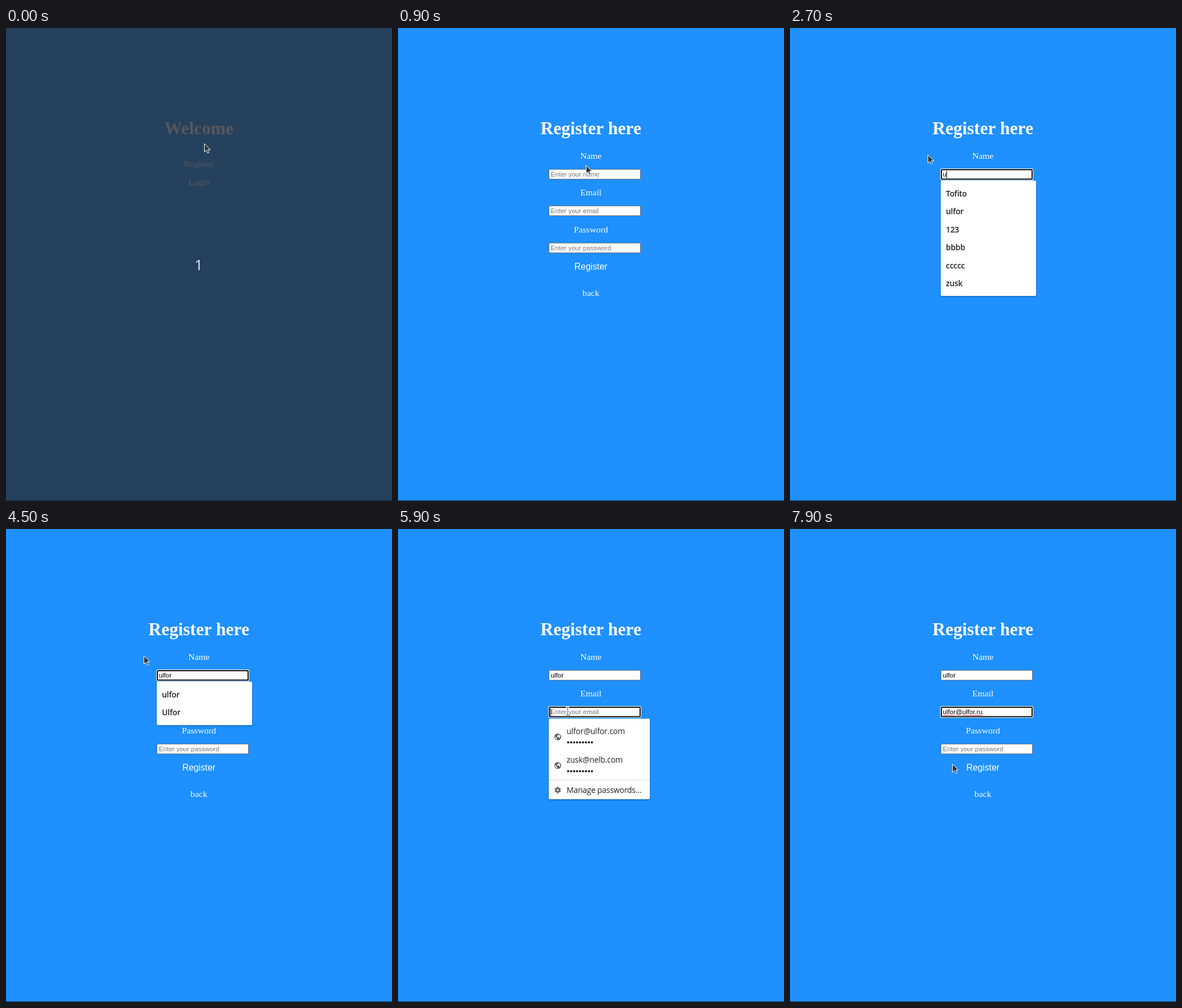
Write an HTML page that moves like this. It is 676x828 px and loops after 8000 ms.

```html
<!DOCTYPE html>
<html lang="en">
<head>
<meta charset="utf-8">
<title>Register form</title>
<style>
  html, body { margin: 0; width: 100%; height: 100%; overflow: hidden; background: #1e90ff; }
  svg { display: block; width: 676px; height: 828px; }
  text { white-space: pre; }
  .page { font: 15.6px "Liberation Serif", serif; fill: #fff; text-anchor: middle; }
  .title { font-size: 31.2px; font-weight: bold; }
  .button { font-family: "Liberation Sans", sans-serif; }
  .input { font: 11.56px "Liberation Sans", sans-serif; }
  .popup { font: 13.8px "Open Sans", sans-serif; letter-spacing: -.2px; fill: #202124; }
  .popup .panel { fill: #fff; filter: drop-shadow(0 1px 1.5px rgba(0, 0, 0, .35)); }
  .list { font-weight: 600; }
  .icon { fill: #5f6368; }
  .countdown { font: 26px "Open Sans", sans-serif; fill: #dbe9ff; text-anchor: middle; }
  .squiggle { fill: none; stroke: #f02828; stroke-width: .9; }
</style>
</head>
<body>
<svg viewBox="0 0 676 828">
  <rect id="back" width="676" height="828"/>
  <g id="welcome" class="page">
    <text class="title" x="337.8" y="186">Welcome</text>
    <text x="337.8" y="243">Register</text>
    <text x="337.8" y="275">Login</text>
  </g>
  <text id="count" class="countdown" x="337.5" y="424">1</text>

  <g id="form">
    <g class="page">
      <text class="title" x="337.8" y="186">Register here</text>
      <text x="337.8" y="229">Name</text>
      <text x="337.8" y="293">Email</text>
      <text x="337.8" y="357.5">Password</text>
      <text class="button" x="337.8" y="423">Register</text>
      <text x="337.8" y="469">back</text>
    </g>
    <g id="fields"></g>
    <path id="squiggle" class="squiggle"/>
    <rect id="caret" width="1" height="13"/>
    <g id="names" class="popup list"></g>
    <g id="logins" class="popup">
      <rect class="panel" x="264" y="332" width="177" height="141" rx="2"/>
      <text x="295.3" y="358.5">ulfor@ulfor.com</text>
      <text x="295.3" y="409">zusk@nelb.com</text>
      <path d="M264 439.5H441" stroke="#dadce0"/>
      <text x="295.3" y="462">Manage passwords…</text>
      <g id="extras"></g>
    </g>
  </g>

  <rect y="827" width="676" height="1" fill="#16283c"/>

  <g id="cursor">
    <path id="arrow" d="M.5 .5V15L3.8 11.9L6.2 17.2L8.6 16.1L6.3 11H10.8Z" fill="#2e3436" stroke="#fff"/>
    <g id="beam" fill="none">
      <path id="stem" d="M-3-7Q0-7 0-5V5Q0 7-3 7M3-7Q0-7 0-5M0 5Q0 7 3 7" stroke="#fff" stroke-width="2"/>
      <use href="#stem"/>
      <path d="M-3-7Q0-7 0-5V5Q0 7-3 7M3-7Q0-7 0-5M0 5Q0 7 3 7" stroke="#555"/>
    </g>
    <path id="hand" d="M-1.5 1Q0-1 1.5 1V7L7 8Q9 9 8.5 11L7 17H-1L-5 10Q-5 8-1.5 11Z" fill="#2e3436" stroke="#fff"/>
  </g>
</svg>

<script>
const LOOP = 8000, TICK = 100, TEXT_X = 267.6;
const $ = id => document.getElementById(id);

function add(parent, tag, attrs, text = "") {
  const node = document.createElementNS("http://www.w3.org/2000/svg", tag);
  for (const key in attrs) node.setAttribute(key, attrs[key]);
  node.textContent = text;
  return parent.appendChild(node);
}
const set = (node, attrs) => { for (const key in attrs) node.setAttribute(key, attrs[key]); };
const show = (node, on) => { node.style.display = on ? "" : "none"; };
const within = (t, from, to) => t >= from && t < to;

// Latest entry of a [time, ...values] track.
const latest = (track, t) => track.reduce((found, step) => step[0] <= t ? step : found);

const pointer = [
  [0, 347, 202, "arrow"], [100, 345.5, 207, "arrow"], [200, 342, 218, "arrow"],
  [300, 337, 229, "arrow"], [400, 334, 234, "hand"], [500, 332, 235, "hand"],
  [700, 331, 235, "arrow"], [900, 329, 240, "arrow"], [1000, 327, 246, "arrow"],
  [1100, 324, 249, "beam"], [1300, 322, 250, "beam"], [1800, 329, 252, "beam"],
  [2000, 288, 236, "arrow"], [2100, 241, 221.5, "arrow"],
  [4700, 256, 300, "arrow"], [4800, 262, 373, "arrow"], [4900, 238, 290, "arrow"],
  [5000, 222, 219, "arrow"], [5300, 238, 245, "arrow"], [5400, 262, 282, "arrow"],
  [5500, 288, 314, "beam"], [5600, 297, 319, "beam"], [6000, 283, 315, "beam"],
  [7700, 283, 340, "arrow"], [7800, 284, 380, "arrow"], [7900, 284, 411, "arrow"]
];
const typed = [[0, 0], [2600, 1], [3200, 2], [3600, 3], [3800, 4], [3900, 5]];
const carets = [
  [0, -1], [1500, 0], [2000, -1], [2600, 0], [4500, -1],
  [5800, 1], [6400, -1], [6800, 1], [7500, -1]
];

const fields = [["name", 247], ["email", 311], ["password", 376]].map(([label, y]) => {
  const g = add($("fields"), "g", { class: "input" });
  return {
    y, hint: `Enter your ${label}`,
    ring: add(g, "rect", { x: 263, y: y - 1, width: 163, height: 20.5, rx: 3, fill: "#fff" }),
    box: add(g, "rect", { x: 264.5, y: y + .5, width: 160, height: 17, fill: "#fff" }),
    text: add(g, "text", { x: TEXT_X, y: y + 13.3 })
  };
});

function drawField({ y, hint, ring, box, text }, value, focused, hovered) {
  show(ring, focused);
  set(box, focused
    ? { x: 265, y: y + 1, width: 159, height: 16.5, rx: 1.5, stroke: "#101010", "stroke-width": 2 }
    : { x: 264.5, y: y + .5, width: 160, height: 17, rx: 0, stroke: hovered ? "#4f4f4f" : "#767676", "stroke-width": 1 });
  text.textContent = value || hint;
  text.setAttribute("fill", value ? "#000" : "#757575");
}

const namePanel = add($("names"), "rect", { class: "panel", x: 264, y: 267, width: 167, rx: 2 });
const nameRows = [...Array(6).keys()].map(i => add($("names"), "text", { x: 273, y: 295 + i * 31.4 }));
const allNames = ["Tofito", "ulfor", "123", "bbbb", "ccccc", "zusk"];
const matches = ["ulfor", "Ulfor"];

function drawNames(list) {
  namePanel.setAttribute("height", 13.5 + list.length * 31.4);
  nameRows.forEach((row, i) => { row.textContent = list[i] || ""; });
}

// Password dots, globes and gear of the login list.
for (const y of [373.5, 424]) {
  for (let i = 0; i < 9; i++) add($("extras"), "circle", { cx: 298 + i * 5.2, cy: y, r: 1.9 });
}
for (const y of [364, 414]) {
  const g = add($("extras"), "g", { class: "icon", transform: `translate(279.8 ${y})` });
  add(g, "circle", { r: 6 });
  add(g, "path", { d: "M-4.6-1L-1.5 2V4.8Q-5 3.5-4.6-1ZM1-4.7V-3L-1-2V0H2L3 2.8Q6.5-2 1-4.7Z", fill: "#fff" });
}
const gear = add($("extras"), "g", { class: "icon", transform: "translate(279.8 457)" });
for (let a = 0; a < 360; a += 60) {
  add(gear, "rect", { x: -1.4, y: -5.6, width: 2.8, height: 3, transform: `rotate(${a})` });
}
add(gear, "circle", { r: 4.2 });
add(gear, "circle", { r: 1.8, fill: "#fff" });

function zigzag(from, to) {
  let d = `M${from} 327`;
  for (let x = from + 1.5, up = true; x <= to; x += 1.5, up = !up) d += `L${x} ${up ? 325.4 : 327}`;
  return d;
}
$("squiggle").setAttribute("d", zigzag(268, 290) + zigzag(302, 337));

function render(t) {
  const dim = t < 100, registering = t >= 700;
  $("back").setAttribute("fill", dim ? "#26415e" : "#1e90ff");
  $("welcome").style.fill = dim ? "#56575d" : "#fff";
  show($("welcome"), !registering);
  show($("count"), dim);
  show($("form"), registering);

  const name = "ulfor".slice(0, latest(typed, t)[1]);
  const email = t >= 6800 ? "ulfor@ulfor.ru" : "";
  drawField(fields[0], name, within(t, 1500, 5000), within(t, 1100, 1500));
  drawField(fields[1], email, t >= 5800, within(t, 5500, 5800));
  drawField(fields[2], "", false, false);

  show($("names"), within(t, 1500, 4900));
  drawNames(t < 2800 ? allNames : matches);
  show($("logins"), within(t, 5800, 6900));
  show($("squiggle"), t >= 7000);

  const active = latest(carets, t)[1];
  show($("caret"), active >= 0);
  if (active >= 0) {
    const { y, text } = fields[active];
    const width = [name, email][active] ? text.getComputedTextLength() : 0;
    set($("caret"), { x: Math.floor(TEXT_X + width), y: y + 3 });
  }

  const [, x, y, shape] = latest(pointer, t);
  $("cursor").setAttribute("transform", `translate(${x} ${y})`);
  for (const id of ["arrow", "beam", "hand"]) show($(id), id === shape);
}

const start = performance.now();
let last = -1;
function frame() {
  const tick = Math.floor((performance.now() - start) % LOOP / TICK);
  if (tick !== last) render((last = tick) * TICK);
  requestAnimationFrame(frame);
}
frame();
</script>
</body>
</html>
```
